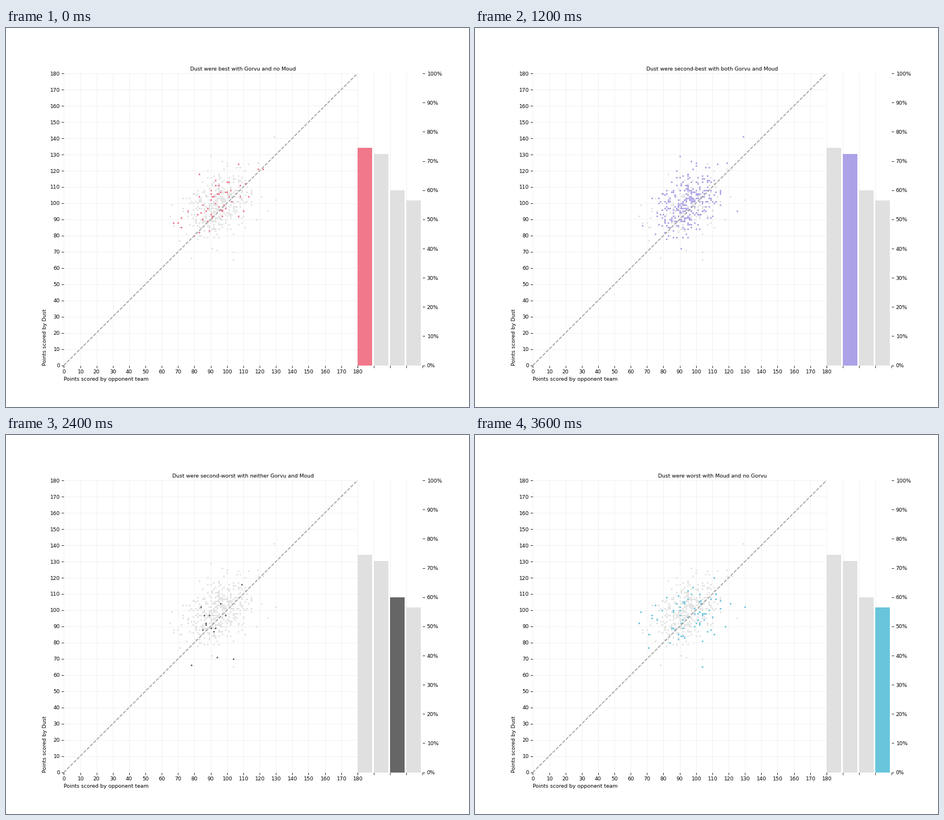
These frames come from a looping animation (827x677 px, 4.8 s). A matplotlib script:

```python
import matplotlib.pyplot as plt
import numpy as np
from matplotlib.animation import FuncAnimation
from matplotlib.ticker import PercentFormatter

WIDTH, HEIGHT, DPI = 827, 677, 75.2
GREY = "#e0e0e0"
TEAM, FIRST, SECOND = "Dust", "Gorvu", "Moud"

plt.rcParams.update({"font.family": "DejaVu Sans", "font.size": 9,
                     "axes.labelsize": 9, "xtick.labelsize": 9, "ytick.labelsize": 9})


def season(count, center, spread, tilt, extremes, seed):
    """Whole-number (opponent, team) scores: a tilted normal cloud plus its extremes."""
    rng = np.random.default_rng(seed)
    z = rng.normal(size=(2 * count, 2))
    z = z[np.hypot(*z.T) < 2.3][:count - len(extremes)]
    z[:, 1] = tilt * z[:, 0] + np.sqrt(1 - tilt ** 2) * z[:, 1]
    cloud = np.rint(center + z * spread).astype(int)
    return np.vstack([cloud, extremes])


# Each group: headline, colour, share of wins, scores
groups = [
    (f"best with {FIRST} and no {SECOND}", "#f0788a", 41 / 55,
     season(55, (93, 100), (10.5, 9.5), 0.35,
            [(67, 88), (107, 124), (119, 121), (122, 121), (83, 118)], seed=3)),
    (f"second-best with both {FIRST} and {SECOND}", "#aca2e8", 0.7235,
     season(285, (95, 102), (10.5, 11), 0.35,
            [(129, 141), (125, 95), (91, 72), (67, 86), (119, 125), (90, 129)], seed=7)),
    (f"second-worst with neither {FIRST} and {SECOND}", "#666666", 0.6,
     season(15, (91, 95), (7, 5), 0.2,
            [(109, 116), (94, 71), (104, 70), (78, 66)], seed=5)),
    (f"worst with {SECOND} and no {FIRST}", "#68c5db", 39 / 69,
     season(75, (95, 98), (12.5, 10.5), 0.25,
            [(130, 102), (104, 65), (65, 92), (66, 99), (118, 90), (71, 77)], seed=11)),
]

# The small excess keeps the pixel size from rounding down.
fig, (ax, bar_ax) = plt.subplots(
    1, 2, figsize=((WIDTH + 0.01) / DPI, (HEIGHT + 0.01) / DPI), dpi=DPI,
    gridspec_kw={"width_ratios": (4.5, 1), "wspace": 0,
                 "left": 0.125, "right": 0.9, "bottom": 0.11, "top": 0.88})

for axes in (ax, bar_ax):
    axes.spines[:].set_visible(False)
    axes.set_axisbelow(True)

ticks = np.arange(0, 181, 10)
ax.set(xlim=(0, 180), ylim=(0, 180), xticks=ticks, yticks=ticks)
ax.grid(color="#b0b0b0", alpha=0.2)
ax.set_xlabel("Points scored by opponent team", loc="left")
ax.set_ylabel(f"Points scored by {TEAM}", loc="bottom")
ax.plot((0, 180), (0, 180), "--", color="#999999", lw=1.5)

bar_ax.set(xlim=(0, 4), ylim=(0, 1), xticks=range(5), yticks=np.linspace(0, 1, 11))
bar_ax.set_xticklabels([])
bar_ax.yaxis.tick_right()
bar_ax.yaxis.set_major_formatter(PercentFormatter(1, decimals=0))
bar_ax.grid(axis="x", color="#b0b0b0", alpha=0.2)

dot_style = {"s": 8, "linewidths": 0}
ax.scatter(*np.vstack([g[3] for g in groups]).T, color=GREY, **dot_style)
highlights = [ax.scatter(*scores.T, color=color, **dot_style)
              for _, color, _, scores in groups]
bars = bar_ax.bar(range(4), [g[2] for g in groups], width=0.9, align="edge", color=GREY)
title = fig.text(0.5125, 0.88 + 5.4 / HEIGHT, "", ha="center", va="baseline")


def update(frame):
    headline, color, _, _ = groups[frame]
    title.set_text(f"{TEAM} were {headline}")
    for i, (dots, bar) in enumerate(zip(highlights, bars)):
        dots.set_visible(i == frame)
        bar.set_facecolor(color if i == frame else GREY)
    return [title, *highlights, *bars]


anim = FuncAnimation(fig, update, frames=len(groups), interval=1200,
                     repeat=True, repeat_delay=0, blit=False)
plt.show()
```
